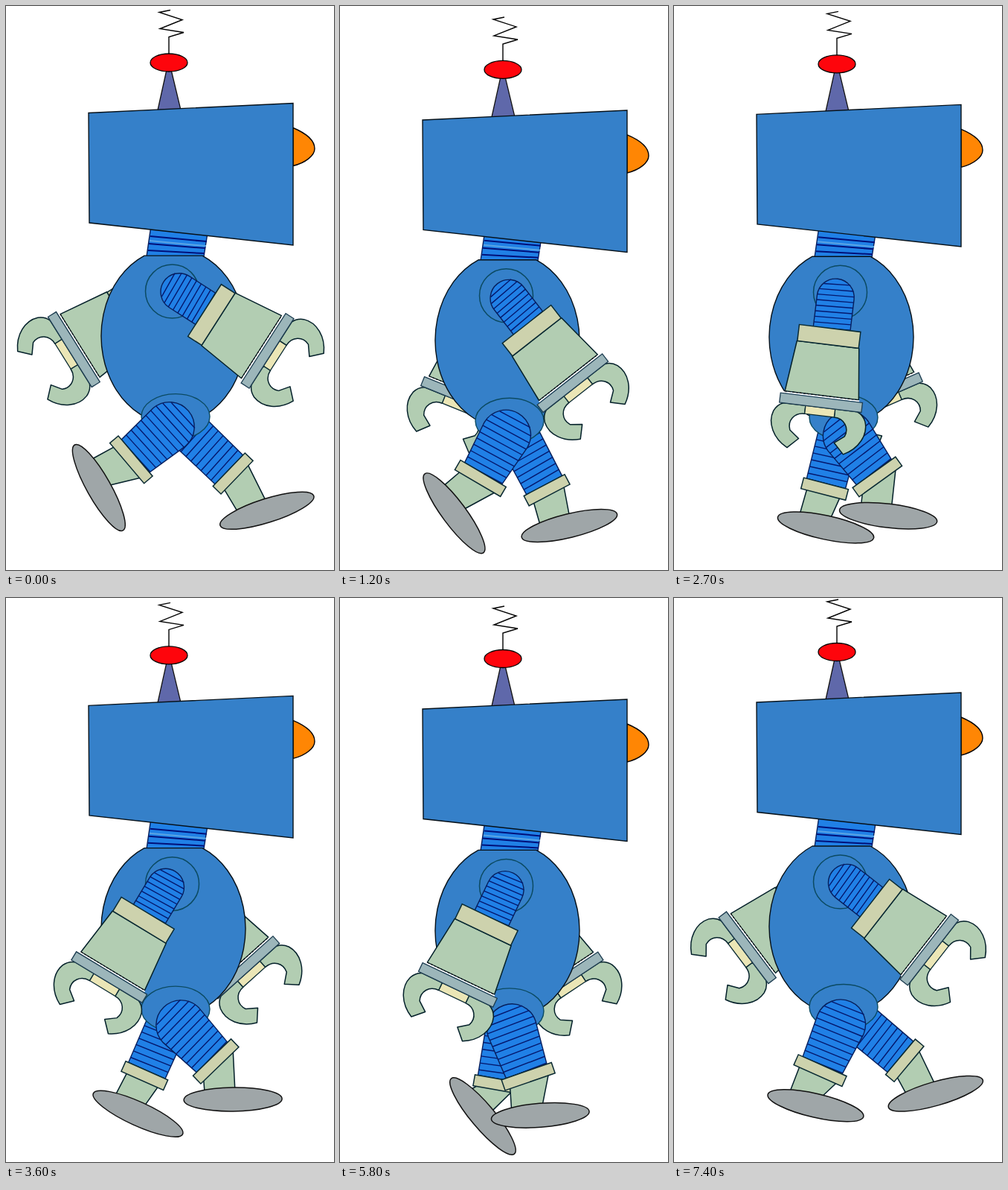
An HTML page for the animation above (7500 ms loop, 441 px wide and 757 px high).

```html
<!DOCTYPE html>
<html lang="en">
<head>
<meta charset="utf-8">
<title>Walking robot</title>
<style>
  html, body { margin: 0; width: 100%; height: 100%; overflow: hidden; background: #fff; }
  svg { display: block; width: 441px; height: 757px; }
  .line { fill: none; stroke: #000; stroke-width: 1.4; }
  .blue { fill: #3580c9; stroke: #061018; stroke-width: 1.4; }
  .socket { fill: none; stroke: #0b4a62; stroke-width: 1.5; }
  .tube { fill: #2080e6; stroke: #061f5c; stroke-width: 1.4; }
  .rings { fill: none; stroke: #04186e; stroke-width: 1.4; }
  .skin { fill: #b2cdb2; stroke: #04202a; stroke-width: 1.5; stroke-linejoin: round; }
  .band { fill: #cdd2ad; stroke: #0a2a33; stroke-width: 1.5; }
  .plate { fill: #9cb6ba; stroke: #1c3c50; stroke-width: 1.3; }
  .link { fill: #ebe6b6; stroke: #0a2a33; stroke-width: 1.3; }
  .foot { fill: #9fa6a8; stroke: #111; stroke-width: 1.5; }
  .gap { stroke: #fff; stroke-width: 2; }
  .dash { stroke: #111; stroke-width: 1.2; stroke-dasharray: 3 2; }
</style>
</head>
<body>
<svg viewBox="0 0 441 757">
  <g id="farArm"></g>
  <g id="farLeg"></g>
  <g id="neck">
    <path class="tube" d="M196 292L273 296L266 340H189Z"/>
    <path d="M193 319L269 326" stroke="#5aa4e4" stroke-width="2"/>
    <path d="M194 313L270 320M192 323L268 329M191 332L267 336" stroke="#00107a" stroke-width="2"/>
  </g>
  <g id="body">
    <path class="blue" d="M186 339H264A97 118 0 1 1 186 339Z"/>
    <circle class="socket" cx="223.5" cy="387" r="36"/>
    <ellipse class="blue" style="stroke:#0b4a62" cx="228" cy="555" rx="46" ry="30.5"/>
  </g>
  <g id="head">
    <path class="line" d="M221 12L206 15L237 25L207 37L239 42L219 48V72"/>
    <path d="M216 92H222L235 146H204Z" fill="#5f68aa" stroke="#111" stroke-width="1.3"/>
    <ellipse cx="219" cy="82.5" rx="25" ry="12" fill="#fe050c" stroke="#000" stroke-width="1.3"/>
    <path d="M386 170C405 178 415 188 415 198C415 207 403 217 386 221Z" fill="#ff8604" stroke="#000" stroke-width="1.4"/>
    <path class="blue" d="M111 150L386 137V327.5L112 297.5Z"/>
  </g>
  <g id="nearLeg"></g>
  <g id="nearArm"></g>
</svg>
<script>
const LOOP = 7500, STEP = 100;
const $ = id => document.getElementById(id);
const rad = deg => deg * Math.PI / 180;

// All joints share these key times and move linearly between them.
const TIMES = [0, 1000, 1900, 3200, 5400, 5800, 7400];
const track = (...values) => t => {
  const i = Math.max(1, TIMES.findIndex(k => k >= t));
  const p = (t - TIMES[i - 1]) / (TIMES[i] - TIMES[i - 1]);
  return values[i - 1] + (values[i] - values[i - 1]) * p;
};

const bob = track(-6.5, 3.8, 0, -7.5, 3, -1, -10);
const nearArm = {
  angle: track(57.3, 41.2, 26.8, -28, -45, -25.5, 52),
  x: track(233, 228, 224, 213, 221, 222, 232.5)
};
const farArm = { angle: track(-58, -28, -1, 39, 55, 33.5, -53) };
const nearLeg = {
  angle: track(-49.6, -43.6, 16, 48, 26, 19, -24),
  tilt: track(60.5, 64.5, 14.5, 2, -13, -4.5, 13),
  reach: track(125, 128, 118, 119, 125, 122, 113),
  hip: track(569, 570.5, 586, 576, 580, 579, 578.5)
};
const farLeg = {
  angle: track(46, 36, -1, -23, -28, -10, 50),
  tilt: track(-17.5, -17, -2, 21, 40, 50, -16),
  reach: track(167, 158, 148, 150, 149, 145, 160)
};

// Round-topped tube, r wide at the joint and w wide at its far end, with rings.
function tube(r, w, len, gap) {
  let rings = "";
  for (let y = gap - r; y < len; y += gap) {
    const h = y < 0 ? Math.sqrt(r * r - y * y) : r + (w - r) * y / len;
    rings += `M${-h} ${y + 1}L${h} ${y - 1}`;
  }
  return `<path class="tube" d="M${-r} 0A${r} ${r} 0 0 1 ${r} 0L${w} ${len}H${-w}Z"/>
    <path class="rings" d="${rings}"/>`;
}

const rect = (cls, half, y, h) =>
  `<rect class="${cls}" x="${-half}" y="${y}" width="${2 * half}" height="${h}"/>`;

function makeArm(id) {
  const claw = `<path class="skin" d="M20 160C34 160 42 172 37 184L24 194L38 208C58 198 68 178 62 161Q58 152 50 149H20Z"/>`;
  const g = $(id);
  g.innerHTML = tube(25, 25, 44, 7.5) +
    `<g transform="translate(-2.5 0)">
      <path class="skin" d="M-42 64H42L50 133H-50Z"/>
      ${rect("band", 41.5, 42, 22)}
      <path class="gap" d="M-51 134.5H51"/><path class="dash" d="M-50 133H50"/>
      ${claw}<g transform="scale(-1 1)">${claw}</g>
      ${rect("link", 20, 149, 11)}${rect("plate", 55.5, 136, 13)}
    </g>`;
  return (angle, x, y) =>
    g.setAttribute("transform", `translate(${x} ${y}) rotate(${-angle})`);
}

function makeLeg(id, r, w, len, cuff, heel) {
  const g = $(id);
  g.innerHTML = `<path class="skin"/>${tube(r, w, len, 9.3)}${rect("band", cuff, len, 15)}
    <ellipse class="foot" rx="66" ry="16"/>`;
  const shin = g.firstElementChild, foot = g.lastElementChild;
  const top = cuff - 8;
  return (leg, t, x, y) => {
    const angle = leg.angle(t), bend = leg.tilt(t) + angle;
    // The foot slides back along its sole as the ankle bends.
    const fx = heel - 0.6 * bend, fy = leg.reach(t);
    const c = Math.cos(rad(bend)), s = Math.sin(rad(bend));
    const sole = d => `${fx + d * c + 10 * s} ${fy + d * s - 10 * c}`;
    shin.setAttribute("d",
      `M${-top} ${len + 12}H${top}L${sole(3)}L${sole(-38)}Z`);
    foot.setAttribute("transform", `translate(${fx} ${fy}) rotate(${bend})`);
    g.setAttribute("transform", `translate(${x} ${y}) rotate(${-angle})`);
  };
}

const poseNearArm = makeArm("nearArm"), poseFarArm = makeArm("farArm");
const poseNearLeg = makeLeg("nearLeg", 33.5, 29, 60, 35.5, 7);
const poseFarLeg = makeLeg("farLeg", 28, 27, 92, 31, 13);

function draw(t) {
  const head = bob(t), body = 0.6 * head;
  $("head").setAttribute("transform", `translate(0 ${head})`);
  for (const id of ["neck", "body"]) $(id).setAttribute("transform", `translate(0 ${body})`);

  const near = nearArm.angle(t), far = farArm.angle(t);
  poseNearArm(near, nearArm.x(t), 394 + body - 9 * Math.sin(rad(near)) ** 2);
  poseFarArm(far, 222 + 10 * Math.sin(rad(far)), 391.5 + body);

  const front = nearLeg.angle(t), back = farLeg.angle(t);
  poseNearLeg(nearLeg, t, 228 + front / 6, nearLeg.hip(t) + body);
  poseFarLeg(farLeg, t, 229 + back / 10, 556.5 + back / 8 + body);
}

const start = performance.now();
function tick() {
  const t = (performance.now() - start) % LOOP;
  draw(Math.floor(t / STEP) * STEP);
  requestAnimationFrame(tick);
}
tick();
</script>
</body>
</html>
```
